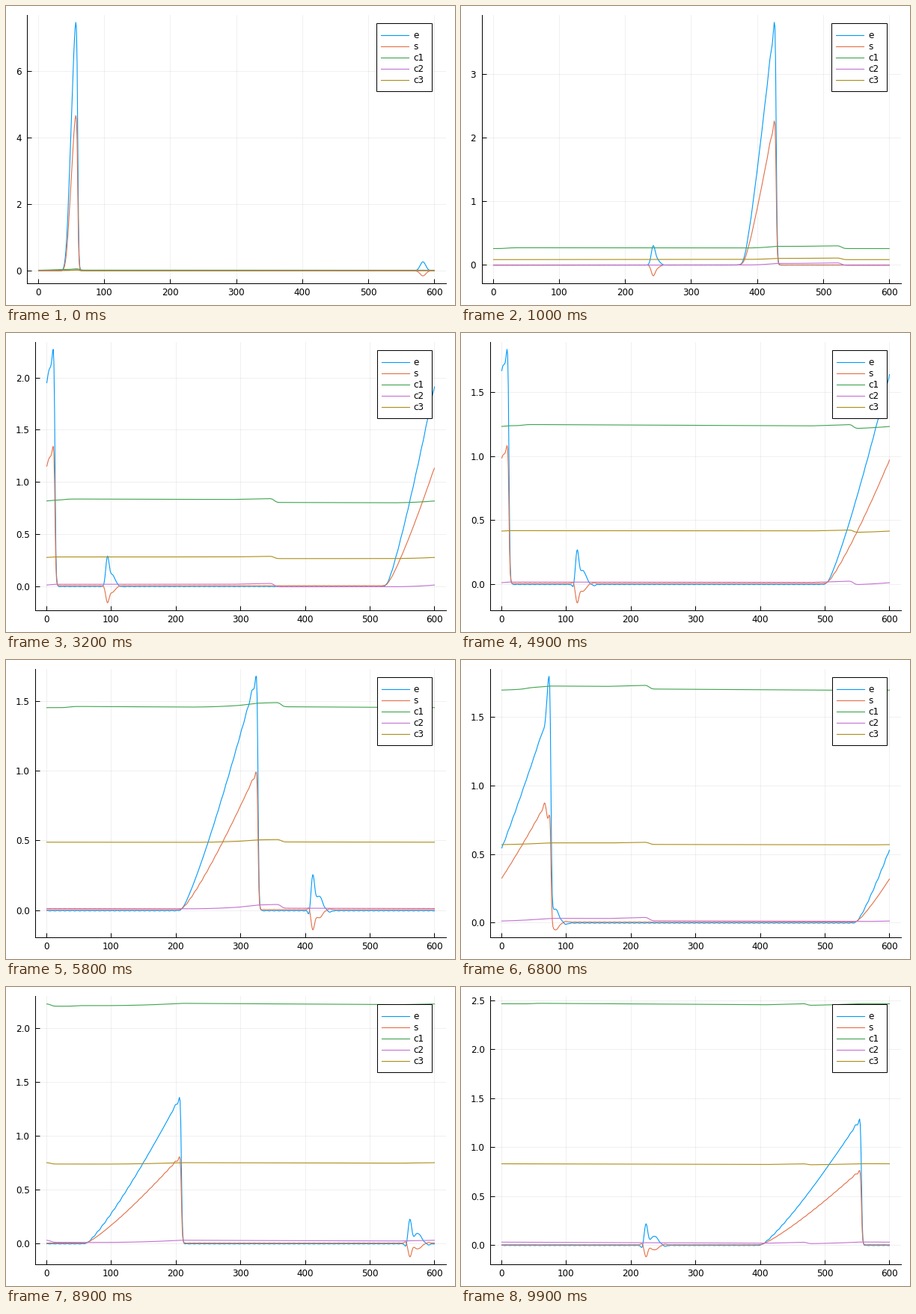
A matplotlib script that plays this animation: 600x400 px, repeating every 10000 ms.

```python
import numpy as np
import matplotlib.pyplot as plt
from matplotlib.animation import FuncAnimation
from matplotlib.patches import Rectangle

W, H, DPI = 600, 400, 100
FRAMES, STEP_MS = 100, 100
N = 600
PX = 72 / DPI
TOP, BOTTOM, RIGHT = 11.7, 371.2, 588
NAMES = ["e", "s", "c1", "c2", "c3"]
COLORS = ["#009afa", "#e36f47", "#3ea44e", "#c371d2", "#ac8e18"]
x = np.arange(1, N + 1)

plt.rcParams.update({"font.family": "DejaVu Sans", "font.size": 12 * PX})


def offset(p, before=N / 2):
    """Signed distance from p on the periodic domain."""
    return (x - p + before) % N - before


def gauss(d, width):
    return np.exp(-0.5 * (d / width) ** 2)


def shock(k):
    """Right-moving pulse that steepens into a sawtooth and spreads."""
    early = np.exp(-k / 4)
    length = np.sqrt(252 * (k + 1)) + 8.5 * np.exp(-k / 5)
    front = 35.6 + 33.965 * k + length
    amp = (207 + 18 * np.exp(-k / 40)) / length * (1 - 0.137 * early)
    base = length - 3
    q = offset(front - base, 100)
    d = q - base
    u = 2.2 * np.logaddexp(0, q / 2.2) / base
    ramp = np.minimum(u, 1.2) ** 1.2
    bell = np.sin(np.pi / 2 * np.minimum(u, 1)) ** 2
    wave = np.cos(2 * np.pi * (d + 2.3) / 8)
    ripple = (0.03 * np.exp(-np.abs(d + 2.3) / 5) + 0.0015 * (q > 4)) * wave
    shape = early * bell + (1 - early) * (ramp + ripple)
    return amp * shape * 0.5 * (1 - np.tanh(d / 1.5))


def echo(k):
    """Small left-moving pulse that grows a trailing shoulder."""
    late = 1 - np.exp(-k / 8)
    d = offset(583 - 34.05 * k + 0.0012 * k * k)
    lag = 5 + 0.08 * k
    dip = np.clip(0.0015 * (k - 28), 0, 0.035)
    y = (0.285 - 0.00075 * k - 0.015 * (1 - late)) * gauss(d, 2.6 + 1.6 * np.exp(-k / 6))
    y += late * (0.12 - 0.00025 * k) * gauss(d - lag, 4 + 0.02 * k)
    y -= dip * gauss(d + 6, 1.6)
    y -= 0.3 * dip * gauss(d - lag - 17, 2.5)
    return y


def drift(k, tri):
    """Periodic part shared by the c curves."""
    d = offset(62.8 + 46.57 * k, 500)
    slope = 0.024 * tri / tri.sum()
    slope += 0.009 / 60 * ((d > -66) & (d < -6))
    fall = gauss(d, 3.2)
    slope -= (0.042 - 0.00026 * k) * fall / fall.sum()
    w = np.cumsum(slope - slope.mean())
    return w - w.mean() + 0.001 + 0.00023 * k


def curves(k):
    tri, back = shock(k), echo(k)
    calm = min(1, k / 25)
    hum = 0.002 * calm * np.sin(2 * np.pi * x / 7.7)
    e = tri + back - 0.004 * calm + hum
    s = (0.588 + 0.037 * np.exp(-k / 5)) * tri - 0.56 * back + 0.003 * calm - 0.6 * hum
    w = drift(k, tri)
    base = 0.014 + 0.0249 * k - 5e-6 * k * k
    bump = (0.014 - 7e-5 * k) / (1 + np.exp(-(x - 18 - 0.3 * k) / 4)) * (1 - x / N)
    return e, s, base + 1.1 * w + bump, w, base / 3 + 0.65 * w


fig = plt.figure(figsize=(W / DPI, H / DPI), dpi=DPI, facecolor="white")
ax = fig.add_axes([0.05, 0.07, 0.9, 0.9])
ax.set_xlim(1 - 0.03 * (N - 1), N + 0.03 * (N - 1))
ax.set_xticks(range(0, N + 1, 100))
ax.set_axisbelow(True)
ax.grid(color="black", alpha=0.07, lw=0.6)
ax.spines[["top", "right"]].set_visible(False)
ax.spines[["left", "bottom"]].set_linewidth(PX)
ax.tick_params(direction="in", length=6 * PX, width=PX)
ax.tick_params(axis="x", pad=5.5 * PX)
ax.tick_params(axis="y", pad=7.5 * PX)
lines = [ax.plot(x, 0 * x, color=c, lw=0.8)[0] for c in COLORS]

# legend, laid out in pixels
key = fig.add_axes([0, 0, 1, 1])
key.set_xlim(0, W)
key.set_ylim(H, 0)
key.axis("off")
box = key.add_patch(Rectangle((494.8, 23.2), 75, 90.6, fc="white", ec="black", lw=PX))
samples, labels = [], []
for i, (name, color) in enumerate(zip(NAMES, COLORS)):
    y = 39.2 + 15 * i
    samples.append(key.plot([501, 538], [y, y], color=color, lw=0.8)[0])
    labels.append(key.text(544, y + 4, name, va="baseline"))


def place(left):
    ax.set_position([left / W, 1 - BOTTOM / H, (RIGHT - left) / W, (BOTTOM - TOP) / H])
    m = (left - 28) / 11
    x0 = 494.8 + 1.4 * m
    box.set_x(x0)
    box.set_width(569.4 - x0)
    for line, label in zip(samples, labels):
        line.set_xdata([x0 + 6, 538.3 + 0.7 * m])
        label.set_x(544 + 0.7 * m)


def update(k):
    ys = curves(k)
    for line, y in zip(lines, ys):
        line.set_ydata(y)
    lo, hi = np.min(ys), np.max(ys)
    pad = 0.03 * (hi - lo)
    top = hi + pad
    step = 2 if top >= 7 else 1 if top >= 3 else 0.5
    ticks = np.arange(0, top, step)
    ax.set_yticks(ticks, [f"{t:.1f}" if step < 1 else f"{t:.0f}" for t in ticks])
    ax.set_ylim(lo - pad, top)
    place(39 if step < 1 else 28 if top >= 4 else 27.6)
    return lines


anim = FuncAnimation(fig, update, frames=FRAMES, interval=STEP_MS,
                     repeat=True, repeat_delay=0, blit=False)
plt.show()
```
